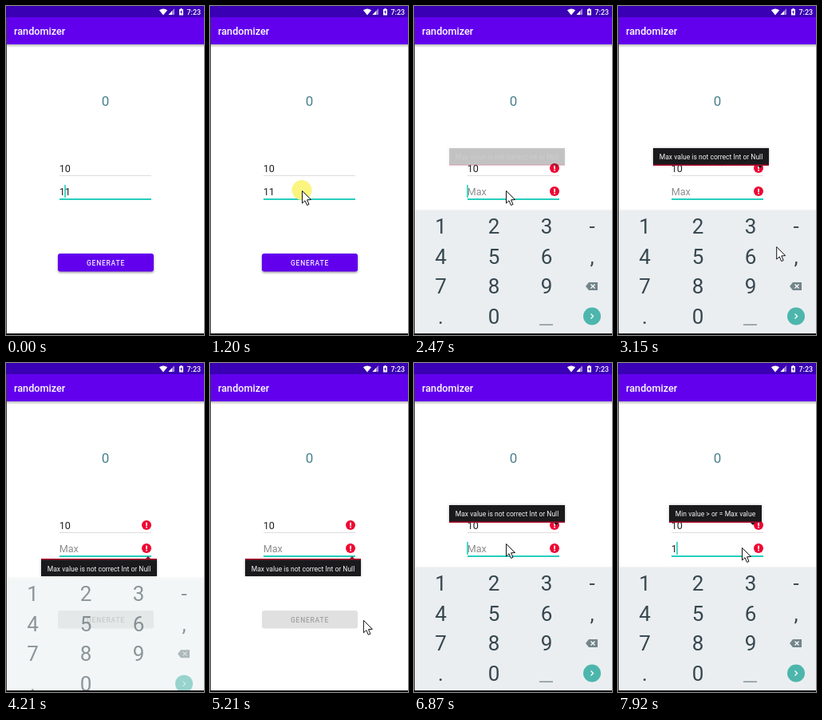
An HTML page with a canvas for the animation above (7.99 s loop, 248x412 px).

```html
<!DOCTYPE html>
<html lang="en">
<head>
<meta charset="utf-8">
<title>randomizer</title>
<style>
  html, body { margin: 0; width: 248px; height: 412px; overflow: hidden; background: #fff; }
  canvas { display: block; }
</style>
</head>
<body>
<canvas id="stage" width="248" height="412"></canvas>
<script>
const ctx = document.getElementById('stage').getContext('2d');
const LOOP = 7990;
const TEAL = '#26cdbd';
const RED = '#ee0833';
const DARK = '#1a1a1d';

// Pointer path: time, x, y
const POINTER = [
  [530, 190, 348], [1130, 115, 231], [2870, 115, 231], [3150, 198, 301], [3400, 250, 330],
  [4670, 231, 316], [4940, 192, 322], [5210, 192, 322], [5740, 115, 226],
  [7130, 115, 226], [7530, 155, 231], [LOOP, 155, 231]
];
// Caret: time its blink starts, x
const CARETS = [[-170, 74], [1310, 81], [2210, 74], [2410, 67], [7860, 74]];

const ramp = (t, from, to) => Math.min(1, Math.max(0, (t - from) / (to - from)));
const between = (t, from, to) => t >= from && t < to;

function rect(x, y, w, h, color) {
  ctx.fillStyle = color;
  ctx.fillRect(x, y, w, h);
}
function circle(x, y, r, color) {
  ctx.fillStyle = color;
  ctx.beginPath();
  ctx.arc(x, y, r, 0, 7);
  ctx.fill();
}
function shape(points, color) {
  ctx.fillStyle = color;
  ctx.beginPath();
  points.forEach(([x, y]) => ctx.lineTo(x, y));
  ctx.closePath();
  ctx.fill();
}
function text(str, x, y, size, color, align = 'left', weight = 400) {
  ctx.font = `${weight} ${size}px Roboto, sans-serif`;
  ctx.textAlign = align;
  ctx.fillStyle = color;
  ctx.fillText(str, x, y);
}
function shade(y, h, from, to) {
  const fill = ctx.createLinearGradient(0, y, 0, y + h);
  fill.addColorStop(0, from);
  fill.addColorStop(1, to);
  rect(0, y, 248, h, fill);
}

function drawBars() {
  shade(48, 4, 'rgba(0,0,0,.28)', 'rgba(0,0,0,0)');
  rect(0, 0, 248, 14, '#3a00b3');
  rect(0, 14, 248, 34, '#6200ee');
  text('randomizer', 10, 36, 12.65, '#fff', 'left', 500);
  text('7:23', 226.5, 10.5, 8.9, '#fff', 'left', 500);
  ctx.fillStyle = '#fff';
  ctx.beginPath();
  ctx.moveTo(197, 11.5);
  ctx.arc(197, 11.5, 8, -Math.PI * 0.72, -Math.PI * 0.28);
  ctx.fill();
  shape([[211, 3], [211, 11], [203.5, 11]], 'rgba(255,255,255,.5)');
  shape([[208, 6.2], [208, 11], [203.5, 11]], '#fff');
  rect(217, 4, 5, 7.5, '#fff');
  rect(218.5, 3, 2, 1, '#fff');
  shape([[220, 5], [218, 8], [219.3, 8], [219, 10.5], [221, 7.3], [219.8, 7.3]], '#3a00b3');
}

function drawErrorIcon(y) {
  circle(176, y, 6, RED);
  rect(175.2, y - 3.3, 1.7, 4.3, '#fff');
  rect(175.2, y + 1.8, 1.7, 1.7, '#fff');
}

function drawFields(t) {
  const value = t < 2210 ? '11' : t < 2410 || t >= 7860 ? '1' : '';
  text('0', 124.5, 125, 17, '#47808d', 'center');
  text('10', 66.7, 208, 12.65, '#202020');
  rect(67, 212, 115, 1, '#dcdcdc');
  text(value || 'Max', 66.7, 237, 12.65, value ? '#202020' : '#8c8c8c');
  rect(67, 241, 115, 2, TEAL);

  const [start, x] = CARETS.filter(c => c[0] <= t).pop();
  if ((t - start) % 992 < 500 && !between(t, 1130, 1310)) rect(x - 0.8, 224, 1.6, 16, TEAL);
  if (t >= 2210) {
    drawErrorIcon(203);
    drawErrorIcon(232);
  }
  if (between(t, 1340, 2280)) {
    circle(81, 248.3, 6, '#38c6b6');
    shape([[81, 241.5], [85.5, 245], [76.5, 245]], '#38c6b6');
  }
}

function drawButton(enabled) {
  ctx.save();
  if (enabled) {
    ctx.shadowColor = 'rgba(0,0,0,.4)';
    ctx.shadowBlur = 3;
    ctx.shadowOffsetY = 1.5;
  }
  ctx.fillStyle = enabled ? '#6200ee' : '#e0e0e0';
  ctx.beginPath();
  ctx.roundRect(65, 310, 120, 22.5, 3);
  ctx.fill();
  ctx.restore();
  ctx.letterSpacing = '0.75px';
  text('GENERATE', 125, 324.5, 8.5, enabled ? '#f3ebff' : '#a0a0a0', 'center', 500);
  ctx.letterSpacing = '0px';
}

function drawKeyboard(open) {
  if (open <= 0) return;
  const ink = '#37474f';
  ctx.save();
  ctx.globalAlpha = open;
  ctx.translate(0, 29 * (1 - open));
  shade(254, 3, 'rgba(0,0,0,0)', 'rgba(0,0,0,.08)');
  rect(0, 257, 248, 155, '#eaeef1');
  ['123-', '456,', '789', '.0'].forEach((row, r) => [...row].forEach((key, c) =>
    text(key, [33.5, 100, 166, 223][c], 285.3 + 37.5 * r, 26, ink, 'center')));
  rect(157, 398.5, 17, 1.3, '#78868d');
  shape([[215, 351], [219, 346], [230, 346], [230, 356], [219, 356]], '#72858a');
  ctx.lineWidth = 1.3;
  ctx.strokeStyle = '#fff';
  ctx.beginPath();
  ctx.moveTo(221.5, 348.5); ctx.lineTo(226.5, 353.5);
  ctx.moveTo(226.5, 348.5); ctx.lineTo(221.5, 353.5);
  ctx.stroke();
  circle(223, 388.5, 11, '#4db6ac');
  ctx.beginPath();
  ctx.moveTo(221.5, 385.5); ctx.lineTo(224.5, 388.5); ctx.lineTo(221.5, 391.5);
  ctx.stroke();
  ctx.restore();
}

function drawPopup(t) {
  if (t < 2280 || between(t, 7860, 7910)) return;
  const order = t < 2470 || t >= 7910;
  const [left, right] = order ? [64, 180] : [44, 189];
  const below = between(t, 4210, 6270);
  const top = below ? 246 : 178;
  const tip = right - 11;
  ctx.save();
  ctx.globalAlpha = t < 2470 ? ramp(t, 2260, 2400) : t < 7860 ? ramp(t, 2430, 2620) : 1;
  ctx.shadowColor = 'rgba(0,0,0,.25)';
  ctx.shadowBlur = 3;
  rect(left, top, right - left, 21, DARK);
  ctx.shadowColor = 'transparent';
  if (below) shape([[tip - 4, 246], [tip, 242], [tip + 4, 246]], '#8d1029');
  else shape([[tip - 4, 199], [tip, 203], [tip + 4, 199]], DARK);
  rect(left, below ? 245 : 198.5, right - left, 1.5, '#b00a2c');
  text(order ? 'Min value > or = Max value' : 'Max value is not correct Int or Null',
    (left + right) / 2, below ? 260.5 : 192, 8.55, '#f4f4f4', 'center');
  ctx.restore();
}

function drawPointer(t) {
  if (between(t, 1130, 1270)) circle(115, 230.5, 12.5, '#fbf580');
  if (between(t, 5880, 6030)) circle(115, 226, 12.5, '#fbf580');
  if (t < 530 || between(t, 3400, 4670)) return;
  const i = POINTER.findIndex(p => p[0] > t);
  const [t0, x0, y0] = POINTER[i - 1];
  const [t1, x1, y1] = POINTER[i];
  const k = ramp(t, t0, t1);
  ctx.save();
  ctx.translate(x0 + (x1 - x0) * k, y0 + (y1 - y0) * k);
  shape([[0.5, 0.5], [0.5, 16], [4, 12.8], [6.5, 18.5], [9, 17.4], [6.6, 11.8], [11.5, 11.5]], '#fff');
  ctx.strokeStyle = '#111';
  ctx.lineWidth = 1;
  ctx.stroke();
  ctx.restore();
}

function draw() {
  const t = performance.now() % LOOP;
  const open = t < 4210 ? ramp(t, 1310, 1600)
    : t < 6000 ? 0.55 * (1 - ramp(t, 4210, 4410))
    : ramp(t, 6110, 6390);
  rect(0, 0, 248, 412, '#fff');
  drawBars();
  drawFields(t);
  drawButton(t < 2210);
  drawKeyboard(open);
  drawPopup(t);
  drawPointer(t);
  rect(0, 14, 1, 398, '#3a3a3a');
  rect(0, 410, 248, 2, '#111');
  requestAnimationFrame(draw);
}
draw();
</script>
</body>
</html>
```
